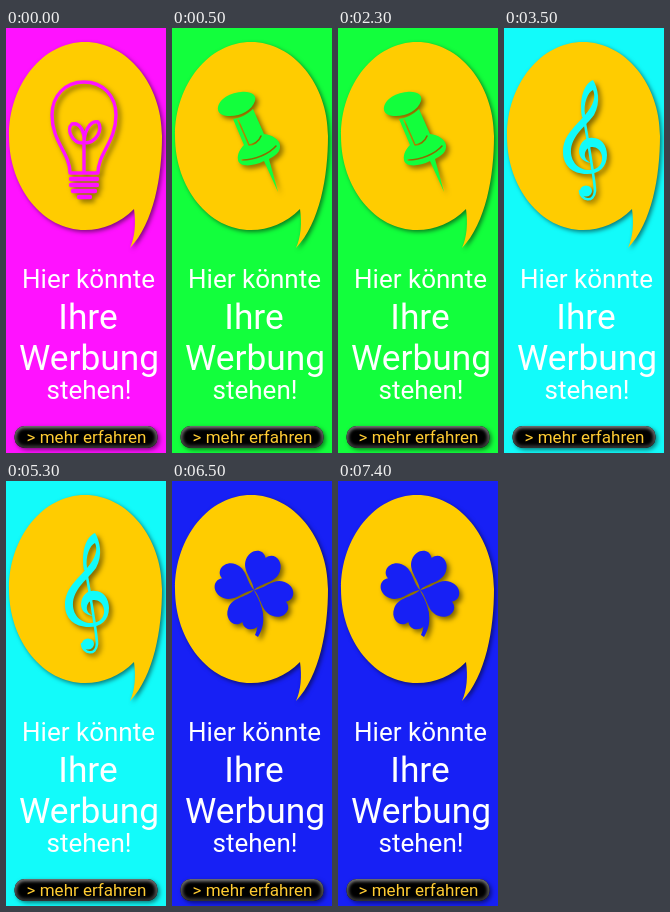
Recreate the animation shown at these times as an HTML page with a canvas. Size 160 by 425 pixels, loop 8 s.

```html
<!DOCTYPE html>
<html lang="de">
<head>
<meta charset="utf-8">
<style>
html, body { margin: 0; width: 100%; height: 100%; overflow: hidden; }
canvas { display: block; }
</style>
</head>
<body>
<canvas id="stage" width="160" height="425"></canvas>
<script>
const ctx = document.getElementById('stage').getContext('2d');
const YELLOW = '#ffcc00';
const LOOP = 8000;

const bubble = new Path2D(`M79 14 C121 14 156 56 156 108 C156 148 148 195 124 220
  C129 209 130 195 128 181 C114 195 97 202 79 202
  C37 202 3 160 3 108 C3 56 37 14 79 14 Z`);

const bulb = new Path2D(`M64 145 C64 125 46 114 46 87 C46 68 59 54 78 54
  C97 54 110 68 110 87 C110 114 92 125 92 145 Z
  M78 145 V115 C66 116 60 101 66 96 C74 94 79 104 78 115
  C78 104 84 92 92 94 C97 101 91 115 78 115`);
const bulbBase = new Path2D('M65 151 H91 M65 157 H91 M67 163 H89 M73 169 H84');

const pinHead = new Path2D(`M46 82 C45 73 56 65 69 64 C79 63 85 67 83 73
  C80 82 69 88 58 88 C51 88 47 86 46 82 Z`);
const pinBody = new Path2D(`M61 91 C69 90 76 86 81 81 L92 106 C100 107 107 111 108 117
  C109 124 103 128 97 131 L106 164 L92 133 C80 139 67 139 66 132
  C65 126 68 121 72 117 Z`);
const pinLines = new Path2D('M66 92 L77 117 C81 117 87 114 89 108 M70 132 C83 132 97 126 104 118');

const clefStem = new Path2D('M76 163 C77 173 90 175 91 163 C91 152 82 102 79 84');
const clefBody = new Path2D(`M78 89 C75 70 80 56 89 52 C94 60 97 74 90 87
  C82 98 69 106 67 121 C66 134 75 142 85 142 C94 142 99 136 98 128
  C96 117 83 116 81 125 C80 130 83 133 87 135
  C79 134 75 129 75 123 C76 113 83 109 89 110 C97 110 103 117 103 127
  C103 139 95 146 83 146 C68 146 59 137 59 124 C59 107 72 98 81 87
  C90 77 92 68 89 62 C84 64 79 75 81 88 Z`);
const clefDot = new Path2D('M76 163 a6 5.5 0 1 0 12 0 a6 5.5 0 1 0 -12 0');

const cloverLeaf = new Path2D(`M0 0 C-5 -10 -18 -14 -18 -26 C-18 -38 -5 -43 0 -34
  C5 -43 18 -38 18 -26 C18 -14 5 -10 0 0 Z`);
const cloverStem = new Path2D('M81 108 C89 121 97 139 86 156 L83 154 C88 144 86 128 81 108 Z');

// Flattens an icon onto its own layer so that it casts a single shadow.
function makeIcon(color, paint) {
  const layer = document.createElement('canvas');
  layer.width = 160;
  layer.height = 425;
  const c = layer.getContext('2d');
  c.fillStyle = c.strokeStyle = color;
  c.lineCap = c.lineJoin = 'round';
  paint(c);
  return layer;
}

function scene(start, color, paint) {
  return { start, color, icon: makeIcon(color, paint) };
}

const scenes = [
  scene(0, '#ff12ff', c => {
    c.lineWidth = 3.4;
    c.stroke(bulb);
    c.lineWidth = 4.4;
    c.stroke(bulbBase);
  }),
  scene(500, '#12ff3c', c => {
    c.fill(pinHead);
    c.fill(pinBody);
    c.globalCompositeOperation = 'destination-out';
    c.lineWidth = 1.6;
    c.stroke(pinLines);
  }),
  scene(3500, '#12fbfa', c => {
    c.lineWidth = 2.6;
    c.stroke(clefStem);
    c.fill(clefBody);
    c.fill(clefDot);
  }),
  scene(6500, '#1720f5', c => {
    c.fill(cloverStem);
    c.translate(82, 109);
    c.rotate(Math.PI / 9);
    for (let leaf = 0; leaf < 4; leaf++) {
      c.fill(cloverLeaf);
      c.rotate(Math.PI / 2);
    }
  })
];

function setShadow(alpha, blur, offset) {
  ctx.shadowColor = `rgba(0,0,0,${alpha})`;
  ctx.shadowBlur = blur;
  ctx.shadowOffsetX = ctx.shadowOffsetY = offset;
}

function text(label, x, y, size, color = '#fff') {
  ctx.font = `${size}px Roboto, sans-serif`;
  ctx.fillStyle = color;
  ctx.fillText(label, x, y);
}

function drawButton() {
  ctx.save();
  ctx.beginPath();
  ctx.roundRect(8.5, 398, 143, 22, 10);
  setShadow(0.5, 4, 2);
  ctx.fillStyle = '#000';
  ctx.fill();
  setShadow(0, 0, 0);
  ctx.clip();
  ctx.filter = 'blur(1.5px)';
  const bevel = ctx.createLinearGradient(0, 398, 0, 420);
  bevel.addColorStop(0, '#777');
  bevel.addColorStop(1, '#333');
  ctx.strokeStyle = bevel;
  ctx.lineWidth = 5;
  ctx.stroke();
  ctx.restore();
  text('> mehr erfahren', 80.5, 415, 17, '#ffcc33');
}

function draw(time) {
  const current = scenes.findLast(s => time >= s.start);
  ctx.fillStyle = current.color;
  ctx.fillRect(0, 0, 160, 425);

  ctx.save();
  setShadow(0.5, 4, 2);
  ctx.fillStyle = YELLOW;
  ctx.fill(bubble);
  setShadow(0.5, 5, 3);
  ctx.drawImage(current.icon, 0, 0);
  ctx.restore();

  ctx.textAlign = 'center';
  text('Hier könnte', 82.5, 260, 26);
  text('Ihre', 82, 301, 35.3);
  text('Werbung', 83, 342, 35.3);
  text('stehen!', 83, 371, 26);
  drawButton();
}

function tick() {
  draw(performance.now() % LOOP);
  requestAnimationFrame(tick);
}
tick();
</script>
</body>
</html>
```
